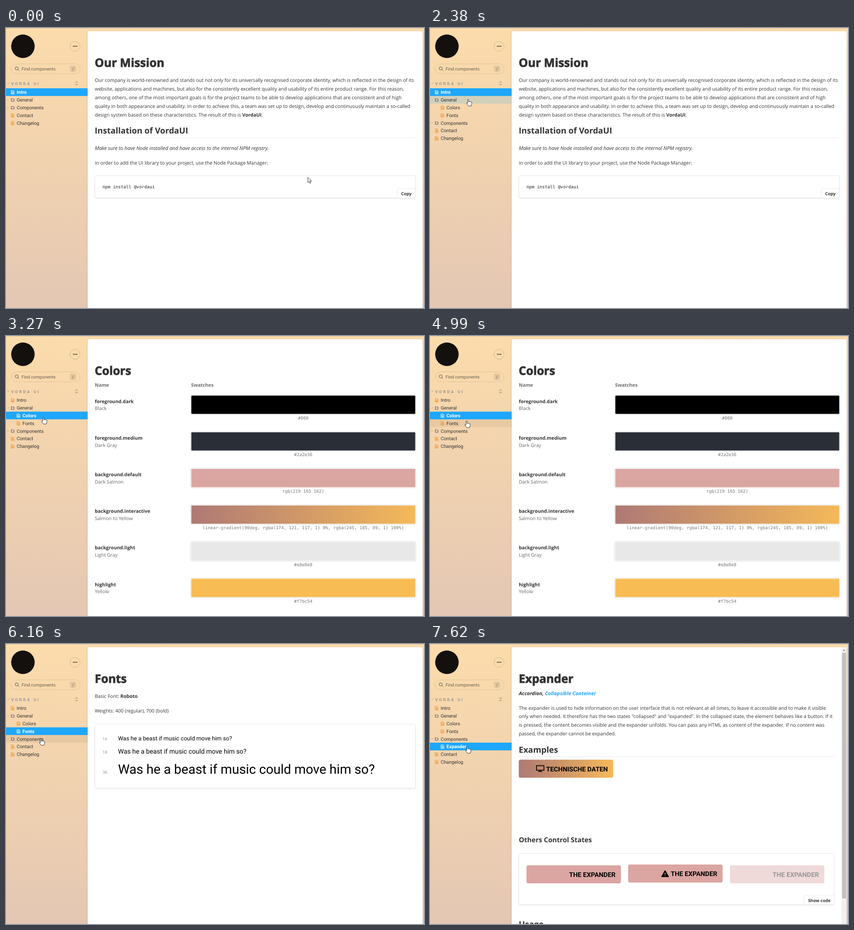
Recreate the animation shown at these times as an HTML page. Size 914 by 613 pixels, loop 8 s.

```html
<!DOCTYPE html>
<html lang="en">
<head>
<meta charset="utf-8">
<title>Component docs</title>
<style>
html, body { margin: 0; width: 100%; height: 100%; overflow: hidden; }
svg { display: block; }
text { font: 10.57px "Open Sans", "Noto Sans", sans-serif; fill: #333; white-space: pre; text-rendering: geometricPrecision; }
.b { font-weight: 700; }
.h1 { font-size: 25.4px; font-weight: 700; stroke: #333; stroke-width: .9px; }
.h2 { font-size: 18.1px; font-weight: 700; }
.h3 { font-size: 14.85px; font-weight: 700; }
.i { font-size: 11px; font-style: italic; }
.name { font-size: 10.4px; font-weight: 700; }
.sub { font-size: 10.5px; fill: #666; }
.mono { font: 9.5px "DejaVu Sans Mono", monospace; fill: #222; }
.hex { fill: #777; text-anchor: middle; }
.act { font-size: 9.3px; font-weight: 700; }
.num { font-size: 9.2px; fill: #8c8c8c; }
.side, .side text { font-family: Roboto, sans-serif; font-size: 10.3px; }
.side .find { font-size: 9.6px; fill: #6b5f50; }
.side .root { font-size: 8.7px; font-weight: 700; letter-spacing: .35em; fill: #939597; }
.rob { font-family: Roboto, sans-serif; fill: #000; }
.btn { font: 700 14.25px Roboto, sans-serif; fill: #000; text-anchor: end; }
.card { fill: #fff; stroke: #e9e9e9; filter: drop-shadow(0 1px 1px rgba(0,0,0,.1)); }
.line { fill: none; stroke: #e9e9e9; }
.swatch { stroke: #fff; filter: drop-shadow(0 0 1px rgba(0,0,0,.3)); }
</style>
</head>
<body>
<svg id="stage" width="914" height="613" viewBox="0 0 914 613">
  <defs>
    <linearGradient id="peach" x2="0" y2="1"><stop stop-color="#fcdcab"/><stop offset="1" stop-color="#e4c7b4"/></linearGradient>
    <linearGradient id="warm"><stop stop-color="#ae7975"/><stop offset="1" stop-color="#f5b959"/></linearGradient>
  </defs>
  <rect width="914" height="613" fill="url(#peach)"/>
  <rect width="914" height="1" fill="#dcc39c"/>
  <rect x="178.5" y="7" width="732.5" height="620" rx="3" fill="#fff" style="filter:drop-shadow(0 1px 2px rgba(0,0,0,.12))"/>
  <g class="side">
    <circle cx="37" cy="40" r="25.7" fill="#14100d"/>
    <circle cx="151" cy="40" r="10.8" fill="none" stroke="#d0b48a"/>
    <g fill="#4a4036"><circle cx="147.7" cy="40" r="1.3"/><circle cx="151.2" cy="40" r="1.3"/><circle cx="154.7" cy="40" r="1.3"/></g>
    <rect x="11.5" y="78.5" width="150.5" height="21.5" rx="10.75" fill="none" stroke="#e0c297"/>
    <g fill="none" stroke="#5c5144"><circle cx="23.4" cy="88.4" r="3.4"/><path d="M26 91l2.6 2.6"/></g>
    <text class="find" x="34" y="92.7">Find components</text>
    <rect x="140" y="82.5" width="13" height="13.5" rx="2" fill="#000" opacity=".09"/>
    <text class="find" x="144.6" y="92.7">/</text>
    <path d="M2.8 120h4l-2 2.4z" fill="#b9a68b"/>
    <text class="root" x="11.2" y="124.6">VORDA UI</text>
    <g id="tree"></g>
  </g>
  <g id="page"></g>
  <path id="cursor" fill="#fff" stroke="#222" stroke-width=".9" stroke-linejoin="round"/>
</svg>
<script>
const $ = id => document.getElementById(id);
const text = (x, y, s, cls = '') => `<text x="${x}" y="${y}" class="${cls}">${s}</text>`;
const rect = (x, y, w, h, attrs) => `<rect x="${x}" y="${y}" width="${w}" height="${h}" ${attrs}/>`;
const path = (d, attrs) => `<path d="${d}" ${attrs}/>`;
const card = (y, right, bottom) => rect(194.5, y, right - 194.5, bottom - y, 'rx="3" class="card"');
const title = s => text(194, 85.2, s, 'h1');
const para = (y, lines) => lines.map((s, i) => text(194.2, y + i * 18.85, s)).join('');
const rule = (y, right) => path(`M194 ${y}H${right}`, 'class="line"');
const action = (x, right, bottom, s) =>
  path(`M${x} ${bottom}v-17.5q0-3 3-3H${right}`, 'class="line"') + text(x + 8.7, bottom - 6, s, 'act');

function intro(copied, focused) {
  return title('Our Mission') + para(118.3, [
    'Our company is world-renowned and stands out not only for its universally recognised corporate identity, which is reflected in the design of its',
    'website, applications and machines, but also for the consistently excellent quality and usability of its entire product range. For this reason,',
    'among others, one of the most important goals is for the project teams to be able to develop applications that are consistent and of high',
    'quality in both appearance and usability. In order to achieve this, a team was set up to design, develop and continuously maintain a so-called',
    'design system based on these characteristics. The result of this is <tspan class="b">VordaUI</tspan>.'])
    + text(194, 231.2, 'Installation of VordaUI', 'h2') + rule(240.5, 896)
    + text(194.2, 267, 'Make sure to have Node installed and have access to the internal NPM registry.', 'i')
    + text(194.2, 298.5, 'In order to add the UI library to your project, use the Node Package Manager:')
    + card(323.5, 895.5, 372) + text(211, 351.3, 'npm install @vordaui', 'mono')
    + (copied ? action(846.9, 895.5, 372, 'Copied') : action(855.3, 895.5, 372, 'Copy'))
    + (focused ? rect(847, 368.8, 48, 2.2, 'fill="#1ea7fd"') : '');
}

const swatches = [
  ['foreground.dark', 'Black', '#000'],
  ['foreground.medium', 'Dark Gray', '#2a2e36'],
  ['background.default', 'Dark Salmon', 'rgb(219 165 162)'],
  ['background.interactive', 'Salmon to Yellow', 'linear-gradient(90deg, rgba(174, 121, 117, 1) 0%, rgba(245, 185, 89, 1) 100%)'],
  ['background.light', 'Light Gray', '#e8e8e8'],
  ['highlight', 'Yellow', '#f7bc54']
];
const colors = () => title('Colors')
  + `<g opacity=".72">${text(194.2, 111, 'Name', 'name') + text(404.7, 111, 'Swatches', 'name')}</g>`
  + swatches.map(([name, sub, value], i) => {
    const y = 80.2 * i, fill = value[0] == 'l' ? 'url(#warm)' : value;
    return text(194.2, 146.5 + y, name, 'name') + text(194.2, 162.3 + y, sub, 'sub')
      + rect(404.8, 130 + y, 490.5, 41, `rx="2" class="swatch" fill="${fill}"`)
      + text(650, 182.7 + y, value, 'mono hex');
  }).join('');

const fonts = () => title('Fonts')
  + text(194.2, 118.3, 'Basic Font: <tspan class="b">Roboto</tspan>')
  + text(194.2, 149.7, 'Weights: 400 (regular), 700 (bold)')
  + card(175.5, 895.5, 315.5)
  + [[16, 211], [18, 240.3], [36, 284]].map(([size, y]) => text(211, y, size, 'num')
    + `<text x="245" y="${y}" class="rob" style="font-size:${size * .7917}px">Was he a beast if music could move him so?</text>`).join('');

const button = (x, y, fill, label, extra = '') =>
  rect(x, y, 206.5, 39.5, `rx="4" fill="${fill}"`) + text(x + 194.7, y + 25.6, label, 'btn') + extra;

const expander = () => title('Expander')
  + text(194.2, 112, 'Accordion, <tspan fill="#1ea7fd">Collapsible Container</tspan>', 'i b')
  + para(143.5, [
    'The expander is used to hide information on the user interface that is not relevant at all times, to leave it accessible and to make it visible',
    'only when needed. It therefore has the two states "collapsed" and "expanded". In the collapsed state, the element behaves like a button. If it',
    'is pressed, the content becomes visible and the expander unfolds. You can pass any HTML as content of the expander. If no content was',
    'passed, the expander cannot be expanded.'])
  + text(194, 237.8, 'Examples', 'h2') + rule(246.5, 884)
  + button(194.2, 253.3, 'url(#warm)', 'TECHNISCHE DATEN',
    path('M232.8 266.4h16.4v10h-16.4zM241 276.5v2.5M236.8 279.2h8.4', 'fill="none" stroke="#000" stroke-width="1.7" stroke-linejoin="round"'))
  + text(194.2, 434.3, 'Others Control States', 'h3') + card(458.5, 883.5, 570.5)
  + button(211, 484.5, '#dba5a2', 'THE EXPANDER')
  + button(433.3, 482.7, '#dba5a2', 'THE EXPANDER',
    path('M514 496.5l7.2 12.8h-14.4z', 'stroke="#000" stroke-width="2" stroke-linejoin="round"')
    + path('M514 500.5v4.5M514 506.5v1.7', 'stroke="#dba5a2" stroke-width="1.6"'))
  + `<g opacity=".4">${button(655.8, 484.5, '#dba5a2', 'THE EXPANDER')}</g>`
  + action(818, 883.5, 570.5, 'Show code')
  + text(194, 620, 'Usage', 'h2')
  + rect(900, 7, 11, 606, 'fill="#f1f1f1"') + rect(901, 19, 9, 538, 'fill="#c1c1c1"')
  + path('M902.8 15l2.7-3.4 2.7 3.4z', 'fill="#8a8a8a"');

const rowTop = i => 132 + 16.8 * i;
function tree(open, selected, focus, pointerRow) {
  const rows = ['Intro', '+General', ...(open > 0 ? ['-Colors', '-Fonts'] : []),
    '+Components', ...(open > 1 ? ['-Expander'] : []), 'Contact', 'Changelog'];
  const chevrons = open > 1 ? 'M151.8 117.3l2.5 2.5 2.5-2.5M151.8 124.7l2.5-2.5 2.5 2.5'
    : 'M151.8 119.7l2.5-2.5 2.5 2.5M151.8 122.5l2.5 2.5 2.5-2.5';
  return path(chevrons, 'fill="none" stroke="#5c5144" stroke-width=".9"') + rows.map((row, i) => {
    const label = row.replace(/^[+-]/, ''), folder = row[0] == '+', x = row[0] == '-' ? 12.6 : 0;
    const on = label == selected, y = rowTop(i), mid = y + 8.6;
    const back = on ? '#1ea7fd' : label == focus ? 'rgba(30,167,253,.16)' : i == pointerRow ? 'rgba(0,0,0,.055)' : '';
    const expanded = label == 'General' ? open > 0 : open > 1;
    const icon = folder
      ? path(`M11.6 ${mid + 3}v-5.6h2.2l1 1h3v4.6z`, 'fill="none" stroke="#3f3a58" stroke-width=".9"')
        + path(expanded ? `M2.8 ${mid - 1}h4l-2 2.4z` : `M3.6 ${mid - 2}v4l2.2-2z`, 'fill="#b9a68b"')
      : path(`M${x + 11.5} ${mid - 3.6}h4.4l1.8 1.8v5.8h-6.2zM${x + 13} ${mid - .8}h3.2m-3.2 1.6h3.2m-3.2 1.6h3.2`,
        `fill="none" stroke="${on ? '#fff' : '#f28f22'}"`);
    return (back && rect(0, y, 178.5, 16.8, `fill="${back}"`)) + icon
      + `<text x="${23.5 + x}" y="${y + 12.3}" ${on ? 'style="fill:#fff;font-weight:700"' : ''}>${label}</text>`;
  }).join('');
}

const HAND = 'M-1.2 9V1.2a1.2 1.2 0 0 1 2.4 0V5.4a1.2 1.2 0 0 1 2.3.3a1.2 1.2 0 0 1 2.3.4a1.2 1.2 0 0 1 2 .9V10.5L6.6 14.6H.6L-3.6 9.4a1.2 1.2 0 0 1 1.4-1.4z';
const ARROW = 'M0 0V11.2L2.7 8.8 4.6 13 6.4 12.2 4.6 8.2H8z';

// Pointer stops: time, x, y
const stops = [
  [0, 660, 327], [70, 660, 327], [680, 873, 362], [950, 873, 362], [1710, 83.5, 155.5],
  [2340, 83.5, 155.5], [2720, 81.5, 178], [4230, 81.5, 178], [4330, 80, 186], [5650, 80, 186],
  [6160, 76.5, 207], [6640, 76.5, 207], [7030, 79.5, 215.7], [7160, 81.5, 224.5], [8000, 81.5, 224.5]
];
function pointer(t) {
  const i = stops.findIndex(s => s[0] > t);
  const [t0, x0, y0] = stops[i - 1], [t1, x1, y1] = stops[i];
  const p = (t - t0) / (t1 - t0), e = p * p * (3 - 2 * p);
  return [x0 + (x1 - x0) * e, y0 + (y1 - y0) * e];
}

const shown = {};
function put(id, html) {
  if (shown[id] !== html) $(id).innerHTML = shown[id] = html;
}

function draw() {
  const t = performance.now() % 8000;
  const [x, y] = pointer(t);
  const selected = t < 3270 ? 'Intro' : t < 5060 ? 'Colors' : t < 7490 ? 'Fonts' : 'Expander';
  const open = t < 2240 ? 0 : t < 6490 ? 1 : 2;
  const focus = t >= 2240 && t < 3270 ? 'General' : t >= 6490 && t < 7490 ? 'Components' : '';
  const inTree = x < 178 && y > 132;
  const onCopy = t < 3270 && x > 850 && y > 351;

  put('tree', tree(open, selected, focus, inTree ? Math.floor((y - 132) / 16.8) : -1));
  put('page', selected == 'Intro' ? intro(t >= 800 && t < 2310, t >= 800 && t < 2240)
    : { Colors: colors, Fonts: fonts, Expander: expander }[selected]());
  $('cursor').setAttribute('d', inTree || onCopy ? HAND : ARROW);
  $('cursor').setAttribute('transform', `translate(${x} ${y})`);
  requestAnimationFrame(draw);
}
draw();
</script>
</body>
</html>
```
